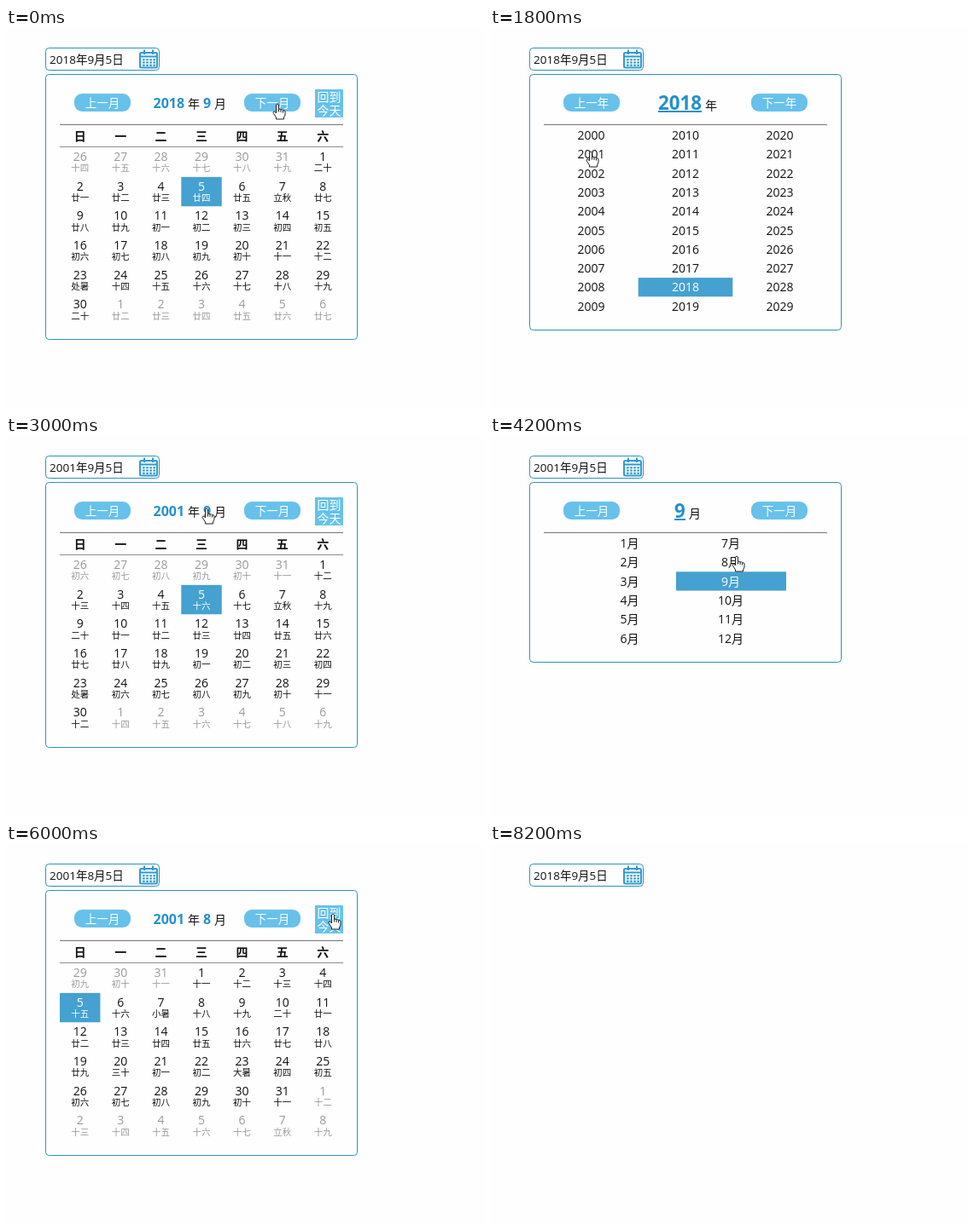
These frames come from a looping animation (560 px wide and 446 px high, 8800 ms). An HTML page:

```html
<!DOCTYPE html>
<html lang="zh-CN">
<head>
<meta charset="utf-8">
<title>日历选择器</title>
<style>
html, body { margin: 0; width: 100%; height: 100%; overflow: hidden; background: #fefefe; }
svg { display: block; width: 560px; height: 446px; }
text { font-family: "Open Sans", "Noto Sans CJK SC", "Noto Sans CJK", sans-serif; font-size: 14px; fill: #111; white-space: pre; }
.mid { text-anchor: middle; }
.small { font-size: 10.5px; }
.label { font-size: 13.5px; }
.head { font-size: 16px; }
.big { font-size: 22.4px; }
.bold { font-weight: 700; }
.blue { fill: #2590cb; }
.dim { fill: #999; }
.white { fill: #fff; }
.box { fill: #fefefe; stroke: #2e93b5; }
.pill { fill: #67c1ea; }
.pick { fill: #45a1d0; }
.rule { stroke: #747474; }
.soft { stroke: #8c8c8c; }
.under { stroke: #2590cb; stroke-width: 2; }
.icon { fill: none; stroke: #2f9ad0; stroke-width: 2; }
.pointer { fill: #fff; stroke: #222; stroke-linejoin: round; }
</style>
</head>
<body>
<svg id="stage" viewBox="0 0 560 446">
  <rect class="box" x="46.5" y="23.5" width="133" height="26" rx="4"/>
  <g class="icon">
    <rect x="157" y="29" width="20" height="17.5" rx="1.5"/>
    <path d="M157 33.5H177M162 25.5V31M172 25.5V31"/>
    <path d="M160 37.2H175M160 40.5H175M160 43.8H175" stroke-dasharray="2.8 1.3"/>
  </g>
  <g id="views"></g>
  <g id="hand" class="pointer">
    <path d="M-1.5 1Q0-1 1.5 1V6.5Q3 5.5 4 7Q5.5 6 6.5 7.7Q8.5 7 9 9V13L7.5 16V18H-1.5V16L-5 10.5Q-5 8.5-3.2 9L-1.5 11Z"/>
    <path d="M1.5 6.5V9.5M4 7V10M6.5 7.7V10.5" fill="none"/>
  </g>
  <path id="arrow" class="pointer" d="M0 0V13L3 10.3L5 15L7 14L5 9.6H9Z"/>
</svg>
<script>
const LOOP = 8800, STEP = 200;
const LEFT = 63, RIGHT = 395;
const $ = id => document.getElementById(id);

// Starting time, view, year, month, day
const states = [
  [0, 'days', 2018, 9, 5],
  [800, 'years', 2018, 9, 5],
  [2000, 'days', 2001, 9, 5],
  [3200, 'months', 2001, 9, 5],
  [4600, 'days', 2001, 8, 5],
  [6200, 'days', 2018, 9, 5],
  [6800, 'days', 2018, 9, 9],
  [7200, 'closed', 2018, 9, 5]
];

// Time, x, y, pointer kind
const path = [
  [0, 318, 89, 'hand'], [600, 203, 86, 'hand'], [1000, 193, 90, 'arrow'],
  [1600, 118, 144, 'hand'], [2000, 118, 146, 'hand'], [2200, 123, 157, 'hand'],
  [2400, 125, 155, 'arrow'], [3000, 235, 85, 'hand'], [3400, 240, 92, 'hand'],
  [4200, 289, 141, 'hand'], [4400, 289, 142, 'hand'], [4800, 215, 106, 'arrow'],
  [5400, 294, 94, 'hand'], [6000, 383, 82, 'hand'], [6200, 383, 83, 'arrow'],
  [6600, 90, 217, 'hand'], [6800, 95, 218, 'hand'], [7000, 229, 197, 'hand'],
  [7200, 229, 197, 'arrow'], [7400, 229, 197, '']
];

// Lunar day on the first shown, first of month, first of next; month length; solar terms
const lunar = {
  '2018-9': { prev: 14, first: 20, next: 22, size: 29, terms: { 7: '立秋', 23: '处暑' } },
  '2001-9': { prev: 6, first: 12, next: 14, size: 29, terms: { 7: '立秋', 23: '处暑' } },
  '2001-8': { prev: 9, first: 11, next: 12, size: 30, terms: { 7: '小暑', 23: '大暑' }, nextTerms: { 7: '立秋' } }
};

function lunarName(n) {
  if (n === 20) return '二十';
  if (n === 30) return '三十';
  return '初十廿'[Math.floor((n - 1) / 10)].replace('十', n === 20 ? '二' : '十') +
    '十一二三四五六七八九'[n % 10];
}

const text = (x, y, str, cls = '') => `<text x="${x}" y="${y}" class="${cls}">${str}</text>`;
const mid = (x, y, str, cls = '') => text(x, y, str, 'mid ' + cls);
const rect = (x, y, w, h, cls, r = 0) =>
  `<rect x="${x}" y="${y}" width="${w}" height="${h}" rx="${r}" class="${cls}"/>`;
const line = (x1, x2, y, cls) => `<path d="M${x1} ${y}H${x2}" class="${cls}"/>`;
const panel = bottom => rect(46.5, 54.5, 365, bottom - 54.5, 'box', 4) + line(LEFT, RIGHT, 113.5, 'rule');
const pill = (x, str) => rect(x, 77, 66, 21, 'pill', 9) + mid(x + 33, 93, str, 'label white');

function days(y, m, d) {
  const w = (RIGHT - LEFT) / 7;
  const info = lunar[y + '-' + m];
  const lead = new Date(y, m - 1, 1).getDay();
  const total = new Date(y, m, 0).getDate();
  const before = new Date(y, m - 1, 0).getDate();
  let out = panel(365.5) + pill(80, '上一月') + pill(279, '下一月') +
    text(172.5, 94, y, 'head bold blue') + text(213, 94, '年') +
    text(231, 94, m, 'head bold blue') + text(244, 94, '月') +
    rect(362, 72, 33, 33, 'pill') + mid(378.5, 85.5, '回到', 'white') + mid(378.5, 102, '今天', 'white') +
    line(LEFT, RIGHT, 139.5, 'soft');
  [...'日一二三四五六'].forEach((s, i) => out += mid(LEFT + w * (i + 0.5), 132, s, 'bold'));
  for (let i = 0; i < 42; i++) {
    const x = LEFT + w * (i % 7), top = 140.4 + 34.65 * Math.floor(i / 7);
    let n = i - lead + 1, day, name, cls = 'dim';
    if (n < 1) {
      day = before + n;
      name = lunarName(info.prev + i);
    } else if (n > total) {
      day = n - total;
      name = (info.nextTerms || {})[day] || lunarName(info.next + day - 1);
    } else {
      day = n;
      name = info.terms[n] || lunarName((info.first + n - 2) % info.size + 1);
      cls = n === d ? 'white' : '';
      if (n === d) out += rect(x, top - 0.2, w, 34.4, 'pick');
    }
    out += mid(x + w / 2, top + 15.5, day, cls) + mid(x + w / 2, top + 28, name, 'small ' + cls);
  }
  return out;
}

function list(count, rows, centers, boxX, boxW, chosen, label) {
  let out = '';
  for (let i = 0; i < count; i++) {
    const row = i % rows, on = i === chosen;
    if (on) out += rect(boxX, 114.7 + 22.3 * row, boxW, 22.2, 'pick');
    out += mid(centers[Math.floor(i / rows)], 131 + 22.3 * row, label(i), on ? 'white' : '');
  }
  return out;
}

function years(y) {
  return panel(354.5) + pill(86, '上一年') + pill(306, '下一年') +
    text(197, 95.5, y, 'big bold blue') + line(197, 248, 98, 'under') + text(252, 96, '年') +
    list(30, 10, [118.5, 229, 339.5], 173.7, 110.6, y - 2000, i => 2000 + i);
}

function months(y, m) {
  return panel(265.5) + pill(86, '上一月') + pill(306, '下一月') +
    text(216, 95.5, m, 'big bold blue') + line(216, 229, 98, 'under') + text(233, 96, '月') +
    list(12, 6, [163.5, 282], 218, 129, m - 1, i => i + 1 + '月');
}

const draw = { days, years, months, closed: () => '' };
$('views').innerHTML = states.map(([, view, y, m, d]) =>
  `<g>${text(51, 42, `${y}年${m}月${d}日`, 'label')}${draw[view](y, m, d)}</g>`).join('');
const groups = [...$('views').children];

const lastBefore = (items, t) => items.reduce((found, item, i) => item[0] <= t ? i : found, 0);

function render(now) {
  const t = Math.floor(now % LOOP / STEP) * STEP;
  const shown = lastBefore(states, t);
  groups.forEach((g, i) => g.style.display = i === shown ? '' : 'none');

  const i = lastBefore(path, t);
  const a = path[i], b = path[i + 1] || a;
  const k = a === b ? 0 : (t - a[0]) / (b[0] - a[0]);
  const x = a[1] + (b[1] - a[1]) * k, y = a[2] + (b[2] - a[2]) * k;
  for (const kind of ['hand', 'arrow']) {
    $(kind).style.display = a[3] === kind ? '' : 'none';
    $(kind).setAttribute('transform', `translate(${Math.round(x)} ${Math.round(y)})`);
  }
}

const start = performance.now();
function tick() {
  render(performance.now() - start);
  requestAnimationFrame(tick);
}
tick();
</script>
</body>
</html>
```
